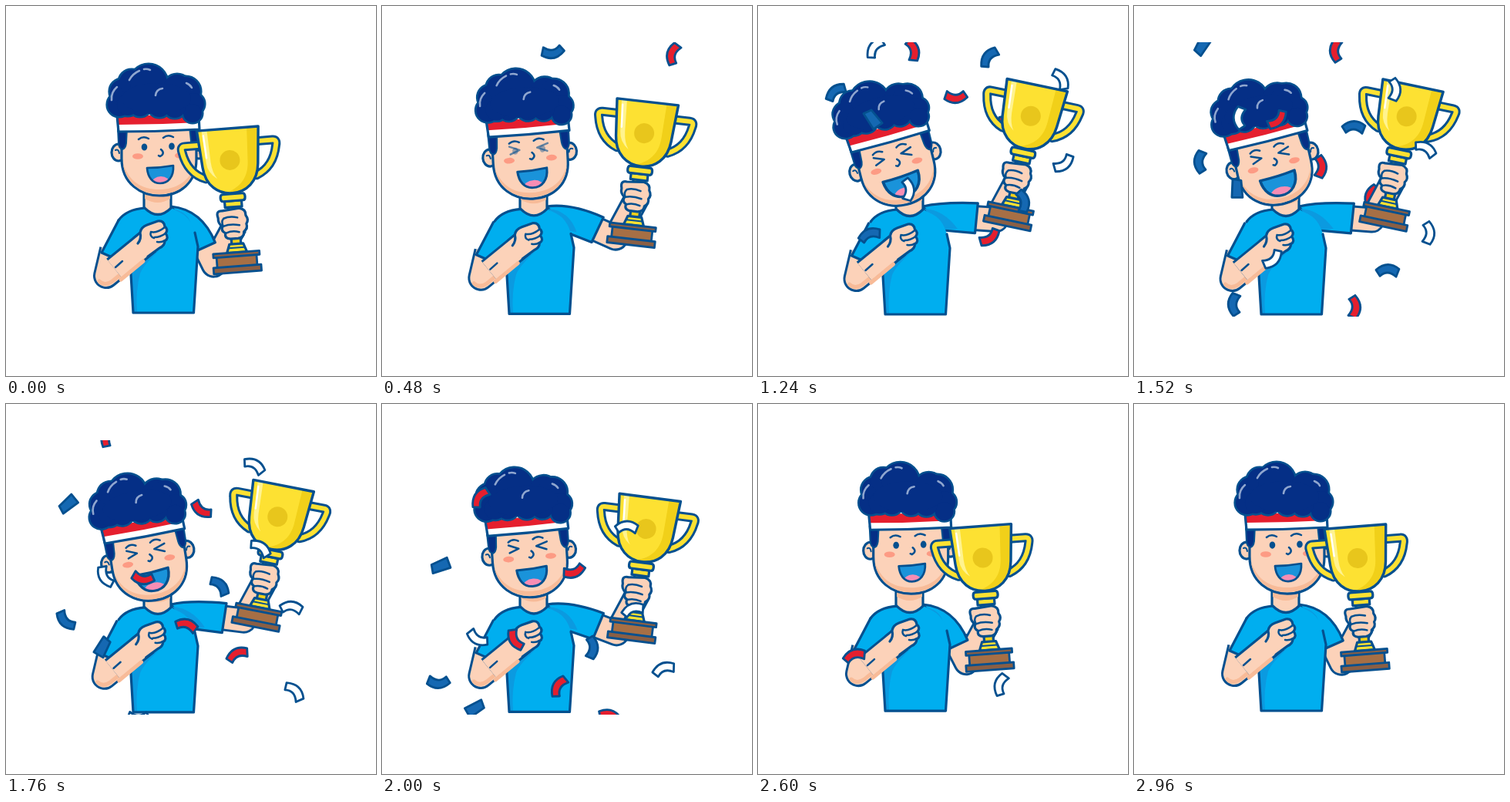
An HTML page with a canvas for the animation above (3000 ms loop, 480 by 480 pixels).

```html
<!DOCTYPE html>
<html>
<head>
<meta charset="utf-8">
<style>
html, body { margin: 0; height: 100%; overflow: hidden; background: #fff; }
canvas { display: block; width: 480px; height: 480px; }
</style>
</head>
<body>
<canvas id="stage" width="480" height="480"></canvas>
<script>
const ctx = document.getElementById('stage').getContext('2d');
const INK = '#04508f', SKIN = '#fcd2b9', SKIN_SHADE = '#f8bb98', SHIRT = '#00aeef', SHIRT_SHADE = '#0b9ae0';
const NAVY = '#052f86', GOLD = '#fde132', GOLD_SHADE = '#f1d019', RED = '#e51f2e', BLUE = '#1568b2', WHITE = '#fff';

// Curls of hair: x, y, radius
const curls = [[147, 128, 16], [151, 111, 17], [163, 99, 17], [185, 100, 25], [222, 107, 19], [233, 111, 20],
  [243, 127, 15], [242, 139, 13], [219, 131, 15], [199, 130, 15], [174, 129, 15], [158, 128, 15]];

// Confetti at 1520 ms: colour, x, y, angle, turn per 480 ms, is flat, is behind the boy
const confetti = [
  [RED, 262, 58, 180, -110], [BLUE, 86, 202, 180, -90], [WHITE, 338, 108, 0, -108],
  [BLUE, 285, 157, 270, 90], [WHITE, 378, 185, 300, -50], [RED, 242, 208, 0, -150],
  [RED, 186, 147, 45, 105], [WHITE, 137, 145, 180, -60], [BLUE, 134, 236, 0, 60, 1],
  [RED, 308, 246, 200, 90, 0, 1], [WHITE, 382, 294, 0, -90], [BLUE, 329, 343, 270, -135],
  [WHITE, 180, 328, 45, 86], [BLUE, 130, 387, 180, -120], [RED, 286, 390, 0, -90],
  [RED, 140, -37, 185, 30], [BLUE, 88, 51, 212, 38, 1], [WHITE, 330, 1, 330, -60]
];

const rad = d => d * Math.PI / 180;
const sigmoid = x => 1 / (1 + Math.exp(-x));
const rise = (t, up, upK, down, downK) => sigmoid((t - up) / upK) * sigmoid((down - t) / downK);

function shape(d, fill, stroke = INK, width = 3.2) {
  const path = new Path2D(d);
  if (fill) { ctx.fillStyle = fill; ctx.fill(path); }
  if (stroke) { ctx.strokeStyle = stroke; ctx.lineWidth = width; ctx.stroke(path); }
}
const line = (d, color = INK, width = 2.5) => shape(d, null, color, width);

function oval(x, y, rx, ry, fill, stroke) {
  ctx.beginPath();
  ctx.ellipse(x, y, rx, ry, 0, 0, 7);
  ctx.fillStyle = fill;
  ctx.fill();
  if (stroke) { ctx.strokeStyle = stroke; ctx.lineWidth = 3.2; ctx.stroke(); }
}

function tube(d, fill, width, cap = 'round') {
  ctx.lineCap = cap;
  line(d, INK, width + 6);
  line(d, fill, width);
  ctx.lineCap = 'round';
}

function group(x, y, angle, draw) {
  ctx.save();
  ctx.translate(x, y);
  ctx.rotate(rad(angle));
  draw();
  ctx.restore();
}

function drawConfetti(t, behind) {
  const drift = s => 16 * Math.max(0, (2500 - s) / 1000) ** 2.7;
  const fall = s => .295 * s + 1e-5 * s * s;
  ctx.save();
  ctx.beginPath();
  ctx.rect(54, 47, 357, 356);
  ctx.clip();
  for (const [color, x, y, angle, turn, flat, back] of confetti) {
    if (!!back !== behind) continue;
    group(x + drift(t) - drift(1520), y + fall(t) - fall(1520), angle + turn * (t - 1520) / 480, () =>
      shape(flat ? 'M-6,-12 L5,-10 L7,12 L-7,12 Z' : 'M1,-15 Q14,0 2,15 L-8,11 Q2,0 -7,-10 Z', color, INK, 2.8));
  }
  ctx.restore();
}

function drawArm(p, elbow, hand) {
  const a = rad(64 - 60 * p), c = Math.cos(a), s = Math.sin(a), w = 14.5 + 5 * p;
  const at = (along, out) => [238 + along * c + out * s, 272 + along * s - out * c];
  tube(`M${at(38, 0)} L${elbow} L${hand}`, SKIN, 28, 'butt');
  shape(`M214,260 Q${at(0, 18)} ${at(46, w)} L${at(45, -w)} L240,${300 - 9 * p} L225,275 Z`, SHIRT);
  shape(`M216,263 Q${at(2, 8)} ${at(22, 4 - w)} L236,290 Z`, SHIRT_SHADE, null);
}

function drawBentArm() {
  tube('M138,316 L130,350 L184,306', SKIN, 28, 'butt');
  line('M121,357 Q128,364 138,357 L176,326', SKIN_SHADE, 5);
  shape('M146,278 L124,320 L149,331 L166,303 Z', SHIRT, null);
  line('M146,278 L124,320 L149,331', INK, 3.2);
  tube('M141,341 L184,306', SKIN, 28, 'butt');
  line('M149,355 L178,331', SKIN_SHADE, 5);
  line('M142,339 L151,331');
  const fist = 'M171,308 Q176,302 174,294 Q175,287 183,284 L197,279 Q205,278 206,286 Q211,290 207,295 Q212,301 206,305 Q206,311 199,314 L184,325';
  shape(fist, SKIN, null);
  line(fist, INK, 3.2);
  line('M188,293 Q196,295 206,287 M193,300 Q200,300 207,295 M196,306 Q202,307 206,304 M188,293 Q186,299 192,301');
}

function drawBody(p) {
  ctx.save();
  ctx.translate(0, p * 2);
  shape('M179,232 V263 Q197,280 214,263 V232 Z', SKIN);
  shape('M180,240 Q197,254 213,240 V250 Q197,260 180,250 Z', SKIN_SHADE, null);
  shape('M180,262 Q156,264 146,278 L124,320 L150,332 L161,318 L162,345 L165,398 H243 L249,312 L245,294 Q240,275 226,268 L214,262 Q197,279 180,262 Z', SHIRT, null);
  shape('M163,340 L200,316 Q178,336 174,347 Q168,370 170,397 H166 Z', SHIRT_SHADE, null);
  line('M180,262 Q156,264 146,278 M161,340 L162,348 L165,398 H243.5 L249,312 L245,294 M180,262 Q197,279 214,262', INK, 3.2);
  ctx.translate(-2.5 * p, 2 * p);
  drawBentArm();
  ctx.restore();
}

function drawFace(q, shut) {
  shape('M150,155 V198 C150,231 176,246 199,246 C226,246 247,229 247,199 V153 Z', SKIN);
  shape('M152,205 C156,232 178,244 199,244 C224,244 242,230 245,206 C238,228 220,238 199,238 C176,238 160,228 152,205 Z', SKIN_SHADE, null);
  shape('M145,158 H157 L156,178 Q155,185 151,186 Q146,184 146,178 Z', NAVY, INK, 2);
  shape('M238,156 H250 L250,176 Q249,184 245,184 Q241,182 240,175 Z', NAVY, INK, 2);
  oval(171, 195, 7, 3.8, '#fd9b84');
  oval(226, 194, 7, 3.8, '#fd9b84');
  line('M172,173 Q178,168 185,172 M204,171 Q210,166 217,170 M201,186 Q207,191 200,195 L198,194');

  ctx.globalAlpha = 1 - shut;
  oval(179.5, 183, 3.8, 4.6, INK);
  oval(215, 182, 3.8, 4.6, INK);
  ctx.globalAlpha = shut;
  line('M172,177 L185,182 L173,187 M222,175 L208,180 L221,185');
  ctx.globalAlpha = 1;

  ctx.save();
  ctx.translate(200, 209);
  ctx.scale(1 + .4 * q, 1 + .25 * q);
  const mouth = 'M-17,1 Q0,1 17,-2 C18,13 10,21 0,21 C-10,21 -16,13 -17,1 Z';
  shape(mouth, '#1a93da', null);
  ctx.save();
  ctx.clip(new Path2D(mouth));
  oval(1, 21, 12, 9, '#f78db4');
  ctx.restore();
  line(mouth, INK, 2.7);
  ctx.restore();
}

function drawHair(q) {
  shape('M144,145 Q197,145 250,142 L251,160 Q198,163 146,163 Z', WHITE, null);
  shape('M144,142 Q197,143 250,139 V151 Q198,154 145,154 Z', RED, null);
  line('M144,142 L146,163 Q198,163 251,160 L250,141', INK, 3.2);
  ctx.save();
  ctx.translate(0, 146);
  ctx.scale(1, 1 - .05 * q);
  ctx.translate(0, -146);
  for (const [x, y, r] of curls) oval(x, y, r, r, INK, INK);
  for (const [x, y, r] of curls) oval(x, y, r - 1, r - 1, NAVY);
  oval(195, 120, 45, 20, NAVY);
  line('M160,96 Q164,88 173,84 M179,82 Q183,81 187,83 M137,122 Q136,112 144,105 M194,116 Q195,108 203,107 M234,100 Q239,102 241,106', '#8fa6cf', 2.6);
  ctx.restore();
}

function drawHead(q, shut) {
  group(201 - 20 * q, 191 + 13 * q, -14.5 * q ** 1.3, () => {
    ctx.translate(-201, -191);
    oval(146, 190, 9, 11, SKIN, INK);
    oval(250, 187, 9, 11, SKIN, INK);
    line('M142,187 Q146,185 147,191 M254,184 Q250,182 249,188', INK, 2);
    drawFace(q, shut);
    drawHair(q);
  });
}

function drawTrophy() {
  tube('M-37,-107 H-57 Q-63,-107 -61,-100 Q-56,-72 -33,-63', GOLD, 6);
  tube('M37,-107 H57 Q63,-107 61,-100 Q56,-72 33,-63', GOLD, 6);
  shape('M-8,-32 H8 L6,-12 V22 L9,36 H-9 L-6,22 V-12 Z', GOLD_SHADE);
  shape('M-11,-32 H11 V-24 H-11 Z', GOLD);
  shape('M-13,-41 H13 Q16,-41 16,-36.5 Q16,-32 13,-32 H-13 Q-16,-32 -16,-36.5 Q-16,-41 -13,-41 Z', GOLD);
  const cup = 'M-40,-126 H40 L36,-78 C34,-54 18,-42 0,-42 C-18,-42 -34,-54 -36,-78 Z';
  shape(cup, GOLD, null);
  ctx.save();
  ctx.clip(new Path2D(cup));
  shape('M25,-127 H42 V-40 H-22 C8,-44 22,-58 23,-82 Z', GOLD_SHADE, null);
  shape('M-34,-127 H-27 L-25,-84 Q-24,-70 -18,-62 Q-30,-70 -31,-84 Z', '#fff38f', null);
  ctx.restore();
  line('M-32,-119 L-30,-90', WHITE, 2.4);
  oval(0, -85, 13, 13, '#e8c61c');
  line(cup, INK, 3.4);
  shape('M-9,24 H9 L13,35 H-13 Z', GOLD);
  line('M-10,29 H10', INK, 2);
  shape('M-27,39 H25 V54 H-27 Z', '#a66f45', INK, 2.8);
  shape('M-31,35 H29 V40 H-31 Z', '#8a5f45', INK, 2.8);
  shape('M-32,53 H30 V61 H-32 Z', '#8a5f45', INK, 2.8);
}

function drawGrip() {
  ctx.translate(-2, -2);
  shape('M-19,-9 Q-22,-19 -13,-18 L9,-20 Q18,-18 17,-10 Q21,-4 17,1 Q19,7 13,11 Q13,18 5,19 H-5 Q-13,18 -11,11 Q-17,8 -14,2 Q-20,-2 -19,-9 Z', SKIN);
  line('M-12,-8 Q-4,-11 6,-8 M-13,2 Q-4,-1 8,2 M-10,11 Q-2,8 7,11 M-12,-8 Q-16,-4 -13,2');
}

function draw(t) {
  const lift = rise(t, 424, 80, 2114, 121);
  const tilt = rise(t, 545, 80, 1900, 170);
  const shut = rise(t, 470, 25, 2150, 25);
  const a = rad(64 - 60 * lift);
  const elbow = [238 + 71 * Math.cos(a), 272 + 71 * Math.sin(a)];
  const hand = [elbow[0] + 27.5, elbow[1] - 51];

  ctx.fillStyle = WHITE;
  ctx.fillRect(0, 0, 480, 480);
  ctx.lineJoin = ctx.lineCap = 'round';
  drawConfetti(t, true);
  drawArm(lift, elbow, hand);
  drawBody(lift);
  drawHead(tilt, shut);
  group(...hand, -4.5 + 16.4 * lift, () => {
    drawTrophy();
    drawGrip();
  });
  drawConfetti(t, false);
}

function frame() {
  draw(performance.now() % 3000);
  requestAnimationFrame(frame);
}
frame();
</script>
</body>
</html>
```
